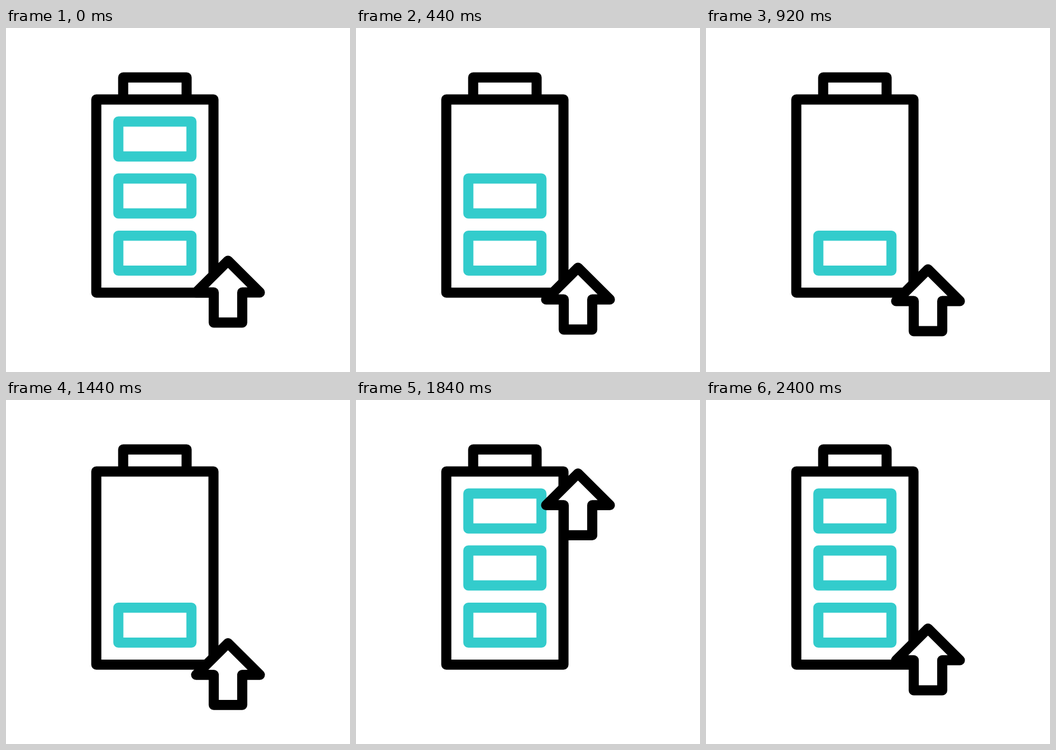
Recreate the animation shown at these times as an HTML page. Size 640x640 px, loop 2440 ms.

```html
<!DOCTYPE html>
<html lang="en">
<head>
<meta charset="utf-8">
<title>Battery charging</title>
<style>
  html, body { margin: 0; width: 100%; height: 100%; overflow: hidden; background: #fff; }
  svg { display: block; width: 100%; height: 100%; }
  g { fill: #fff; stroke: #000; stroke-width: 18.8; stroke-linecap: round; stroke-linejoin: round; }
  .bars { stroke: #33cccc; }
</style>
</head>
<body>
<svg viewBox="0 0 640 640">
  <g>
    <path d="M218 133V92H336V133"/>
    <rect x="168" y="133" width="218" height="359.3"/>
  </g>
  <g class="bars">
    <rect id="top" x="209" y="174" width="136" height="65"/>
    <rect id="mid" x="209" y="280" width="136" height="65"/>
    <rect x="209" y="386.3" width="136" height="65"/>
  </g>
  <g id="arrow">
    <path d="M413 0L472.3 59H439.5V115H386.5V59H353.7Z"/>
  </g>
</svg>
<script>
  const LOOP = 2440, STEP = 40;

  // [time in ms, y of the arrow tip]
  const path = [
    [0, 433], [40, 437.3], [80, 440], [160, 442.8], [440, 446], [560, 447.6],
    [920, 449], [1120, 449.8], [1440, 452.3],
    [1480, 450], [1520, 439], [1560, 411], [1600, 354], [1640, 279],
    [1680, 219], [1720, 180], [1760, 156], [1800, 142], [1840, 136.7],
    [2040, 136.7], [2080, 142], [2120, 167], [2160, 214], [2200, 271],
    [2240, 324], [2280, 366], [2320, 394], [2360, 413], [2400, 425.2], [LOOP, 433]
  ];

  // Time span in which each bar is hidden
  const gaps = { top: [240, 1760], mid: [760, 1600] };

  const find = id => document.getElementById(id);
  const arrow = find('arrow');

  function tipAt(t) {
    const i = path.findIndex(p => p[0] > t);
    const [t0, y0] = path[i - 1], [t1, y1] = path[i];
    return y0 + (y1 - y0) * (t - t0) / (t1 - t0);
  }

  function draw(now) {
    const t = Math.floor(now % LOOP / STEP) * STEP;
    arrow.setAttribute('transform', `translate(0 ${tipAt(t)})`);
    for (const [id, [off, on]] of Object.entries(gaps)) {
      find(id).style.visibility = t >= off && t < on ? 'hidden' : 'visible';
    }
  }

  const start = performance.now();
  function tick() {
    draw(performance.now() - start);
    requestAnimationFrame(tick);
  }
  tick();
</script>
</body>
</html>
```
